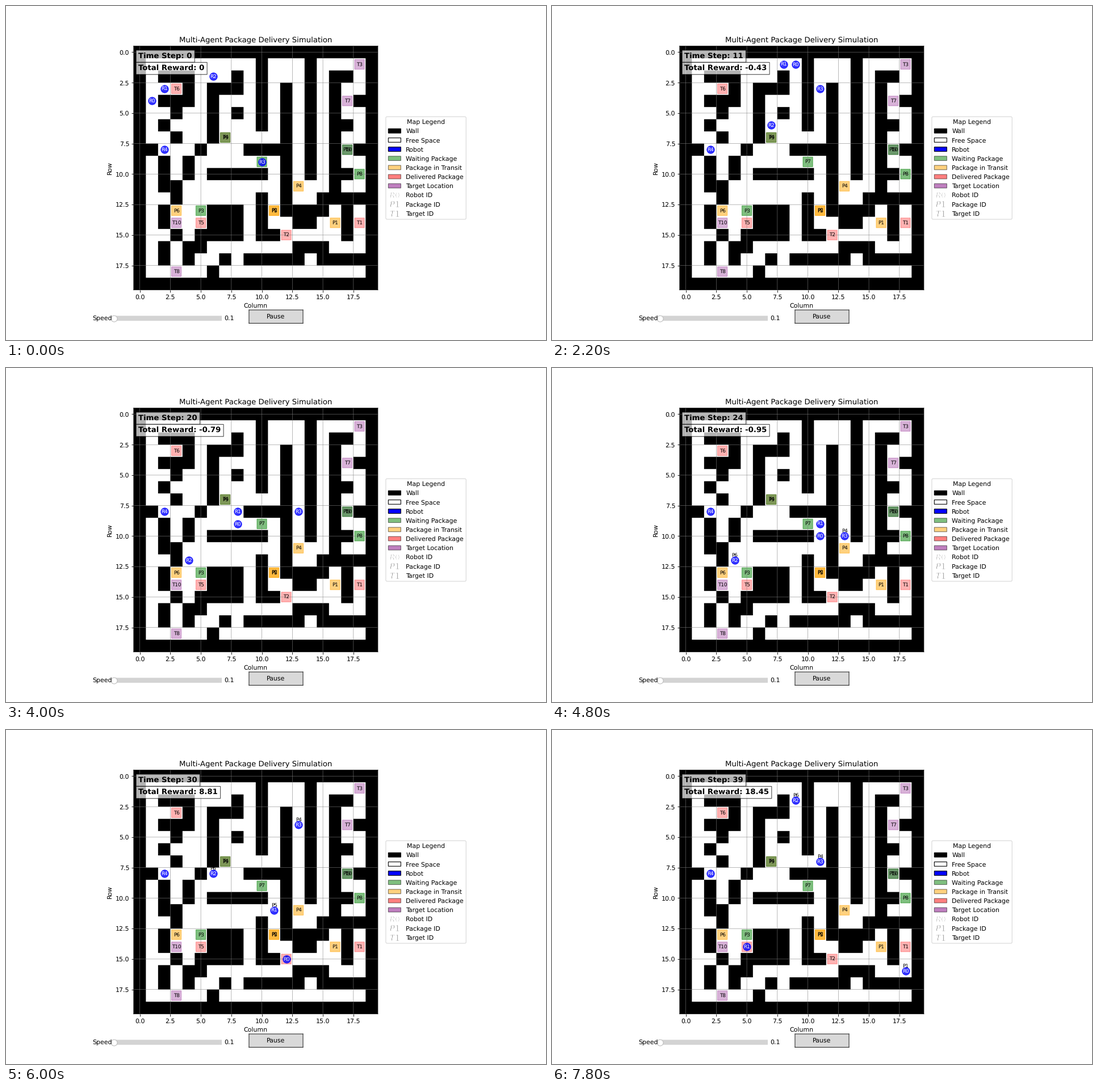
A matplotlib script for the animation above (8 s loop, 951 by 589 pixels).

```python
import matplotlib.pyplot as plt
from matplotlib.animation import FuncAnimation
from matplotlib.lines import Line2D
from matplotlib.patches import Patch, PathPatch, Rectangle
from matplotlib.path import Path
from matplotlib.widgets import Button, Slider

W, H, DPI = 951, 589, 79.25
STEPS, STEP_MS = 40, 200

# keep edges and glyphs at their true sub-pixel places
plt.rcParams.update({"path.snap": False, "text.hinting": "no_hinting"})

MAZE = """
####################
#.........#...#....#
#.###...#.#...#.##.#
#...#.###.#.#.#.#..#
#.###.#...#.#.#.#.##
#..#..#.#.#.#.#.#..#
#.#...#...#.#.#.##.#
#..#..#.....#.#.#..#
##...#...####.#.#.##
#.#.#.......#.#.#..#
#.#.#.#####.#.#.##.#
#.##........#...#..#
#..#......#.#..#####
#.#...###.#.####.#.#
#.#...###.#..##..#.#
#..#.####.##.....#.#
#.#.##.......###...#
#.#.#..#.#####.#####
#.....#............#
####################
""".split()

# name: (column, row)
WAITING = {"P3": (5, 13), "P7": (10, 9), "P8": (18, 10), "P9": (7, 7), "P10": (17, 8)}
TRANSIT = {"P1": (16, 14), "P2": (11, 13), "P4": (13, 11), "P5": (11, 13), "P6": (3, 13)}
DELIVERED = {"T1": (18, 14), "T2": (12, 15), "T4": (7, 7), "T5": (5, 14), "T6": (3, 3)}
TARGETS = {"T3": (18, 1), "T7": (17, 4), "T8": (3, 18), "T9": (17, 8), "T10": (3, 14)}

# start cell, moves (W waits), loads as (package, first step, end step)
ROBOTS = [
    ((1, 4), "U3 R8 D5 L1 D3 R3 D5 R1 D1 R3 U1 R1 D2 R2", [("P2", 27, 30), ("P1", 35, STEPS)]),
    ((2, 3), "W1 L1 U2 R8 D5 L1 D3 R3 D4 U2 L6 D3", [("P5", 28, 39)]),
    ((6, 2), "U1 R3 D3 L2 D4 L1 D1 L1 D2 L1 D2 L1 R1 U2 R1 U2 R1 U1 R1 U4 R2 U2",
     [("P6", 22, STEPS)]),
    ((10, 9), "L2 U2 R3 U5 R2 D9 U9 L2 D5", [("P4", 23, STEPS)]),
    ((2, 8), "W39", []),
]
MOVES = {"U": (0, -1), "D": (0, 1), "L": (-1, 0), "R": (1, 0), "W": (0, 0)}
DELIVERIES = (30, 39)


def walk(start, route):
    cells = [start]
    for leg in route.split():
        dx, dy = MOVES[leg[0]]
        for _ in range(int(leg[1:])):
            x, y = cells[-1]
            cells.append((x + dx, y + dy))
    return cells


def reward(step):
    if step == 0:
        return "0"
    # one robot is held up on the first step
    total = 0.01 - 0.04 * step + 10 * sum(step >= d for d in DELIVERIES)
    return f"{total:.2f}"


def wall_path():
    square = Path.unit_rectangle().vertices - 0.5
    cells = [Path(square + (x, y), closed=True)
             for y, row in enumerate(MAZE) for x, cell in enumerate(row) if cell == "#"]
    return Path.make_compound_path(*cells)


def add_boxes(items, color, alpha):
    for name, (x, y) in items.items():
        ax.add_patch(Rectangle((x - 0.4, y - 0.4), 0.8, 0.8, color=color, alpha=alpha))
        ax.text(x, y, name, ha="center", va="center", fontsize=8)


def add_status(y):
    return ax.text(0.02, y, "", transform=ax.transAxes, fontsize=12, weight="bold",
                   bbox=dict(facecolor="white", alpha=0.7))


fig, ax = plt.subplots(figsize=((W + 1e-6) / DPI, (H + 1e-6) / DPI), dpi=DPI)
fig.subplots_adjust(left=0.125, right=0.8, bottom=0.15, top=0.88)

ax.set(xlim=(-0.5, 19.5), ylim=(19.5, -0.5), aspect="equal",
       title="Multi-Agent Package Delivery Simulation", xlabel="Column", ylabel="Row")
ticks = [2.5 * i for i in range(8)]
ax.set_xticks(ticks)
ax.set_yticks(ticks)
ax.grid(color="gray", linewidth=0.5)
ax.add_patch(PathPatch(wall_path(), facecolor="black", linewidth=0, zorder=0))

add_boxes(DELIVERED, "red", 0.3)
add_boxes(TARGETS, "purple", 0.3)
add_boxes(WAITING, "green", 0.5)
add_boxes(TRANSIT, "orange", 0.5)

keys = [("black", 1, "Wall"), ("white", 1, "Free Space"), ("blue", 1, "Robot"),
        ("green", 0.5, "Waiting Package"), ("orange", 0.5, "Package in Transit"),
        ("red", 0.5, "Delivered Package"), ("purple", 0.5, "Target Location")]
handles = [Patch(facecolor=c, edgecolor="black", alpha=a, label=t) for c, a, t in keys]
for mark, label in (("R0", "Robot ID"), ("P1", "Package ID"), ("T1", "Target ID")):
    handles.append(Line2D([], [], marker=f"${mark}$", color="w", markerfacecolor="black",
                          markersize=15, label=label))
ax.legend(handles=handles, title="Map Legend", loc="center left", bbox_to_anchor=(1.02, 0.5))

slider = Slider(fig.add_axes([0.2, 0.05, 0.2, 0.03]), "Speed", 0.1, 2.0,
                valinit=0.1, valfmt="%.1f")
button = Button(fig.add_axes([0.45, 0.05, 0.1, 0.04]), "Pause")

time_text = add_status(0.95)
reward_text = add_status(0.90)

paths = [walk(start, route) for start, route, _ in ROBOTS]
dots, ids, loads = [], [], []
for i in range(len(ROBOTS)):
    dots += ax.plot([], [], "bo", markersize=12, alpha=0.8, zorder=4)
    ids.append(ax.text(0, 0, f"R{i}", color="white", fontsize=8,
                       ha="center", va="center", zorder=5))
    loads.append(ax.text(0, 0, "", fontsize=8, ha="center", va="center"))


def update(step):
    time_text.set_text(f"Time Step: {step}")
    reward_text.set_text(f"Total Reward: {reward(step)}")
    for path, robot, dot, tag, load in zip(paths, ROBOTS, dots, ids, loads):
        x, y = path[step]
        dot.set_data([x], [y])
        tag.set_position((x, y))
        load.set_position((x, y - 0.4))
        load.set_text("".join(name for name, a, b in robot[2] if a <= step < b))
    return [time_text, reward_text, *dots, *ids, *loads]


anim = FuncAnimation(fig, update, frames=STEPS, interval=STEP_MS, repeat=True, blit=False)
plt.show()
```
